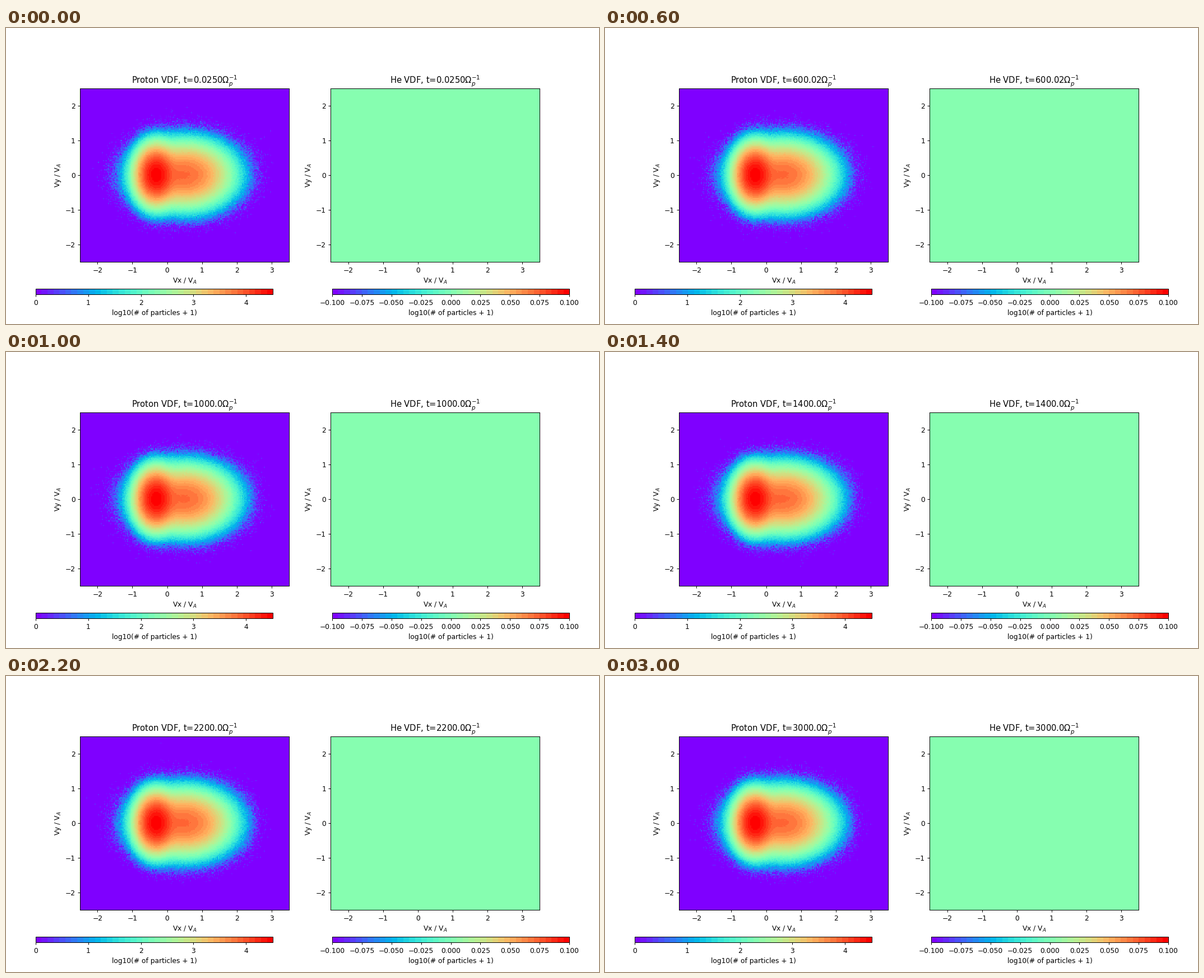
A matplotlib script for the animation above (3.2 s loop, 1058 by 529 pixels).

```python
import numpy as np
import matplotlib.pyplot as plt
from matplotlib.animation import FuncAnimation

FRAMES, INTERVAL = 16, 200
BINS = 200
EXTENT = (-2.5, 3.5, -2.5, 2.5)
VMAX = 4.51
CMAP = plt.get_cmap("rainbow", 40)


def centers(lo, hi):
    step = (hi - lo) / BINS
    return lo + step * (np.arange(BINS) + 0.5)


VX, VY = np.meshgrid(centers(*EXTENT[:2]), centers(*EXTENT[2:]))


def maxwellian(peak, drift, wx, wy):
    return peak * np.exp(-((VX - drift) / wx) ** 2 - (VY / wy) ** 2)


CORE = maxwellian(28800, -0.32, 0.32, 0.45)
BEAM = maxwellian(7100, 0.5, 0.72, 0.50)


def proton_vdf(frame):
    """Log particle counts; the fast tail thins out as time goes on."""
    age = frame / (FRAMES - 1)
    tail = np.exp(-4 * age * np.clip(VX - 2.45, 0, 0.5))
    rng = np.random.default_rng(100 + frame)
    return np.log10(rng.poisson(CORE + BEAM * tail) + 1)


def title(species, frame):
    stamp = f"{200 * frame + 0.025:.4f}"[:6]
    return rf"{species} VDF, t={stamp}$\Omega_p^{{-1}}$"


def panel(ax, data, lo, hi, bar_left):
    image = ax.imshow(data, cmap=CMAP, vmin=lo, vmax=hi, extent=EXTENT,
                      origin="lower", interpolation="nearest")
    ax.set_xticks(range(-2, 4))
    ax.set_yticks(range(-2, 3))
    ax.set_xlabel("Vx / V$_A$")
    ax.set_ylabel("Vy / V$_A$")
    bar_ax = fig.add_axes([bar_left, 0.1, 0.4, 0.02])
    bar = fig.colorbar(image, cax=bar_ax, orientation="horizontal")
    bar.set_label("log10(# of particles + 1)")
    return image, bar


fig, (ax_p, ax_he) = plt.subplots(1, 2, figsize=(12, 6), dpi=529 / 6)
fig.subplots_adjust(bottom=0.125)

protons, bar_p = panel(ax_p, proton_vdf(0), 0, VMAX, 0.05)
bar_p.set_ticks(range(5))
helium, bar_he = panel(ax_he, np.zeros((BINS, BINS)), -0.1, 0.1, 0.55)
bar_he.set_ticks(np.linspace(-0.1, 0.1, 9))


def update(frame):
    protons.set_data(proton_vdf(frame))
    ax_p.set_title(title("Proton", frame))
    ax_he.set_title(title("He", frame))
    return protons, ax_p.title, ax_he.title


anim = FuncAnimation(fig, update, frames=FRAMES, init_func=lambda: update(0),
                     interval=INTERVAL, repeat=True, repeat_delay=0, blit=False)
plt.show()
```
